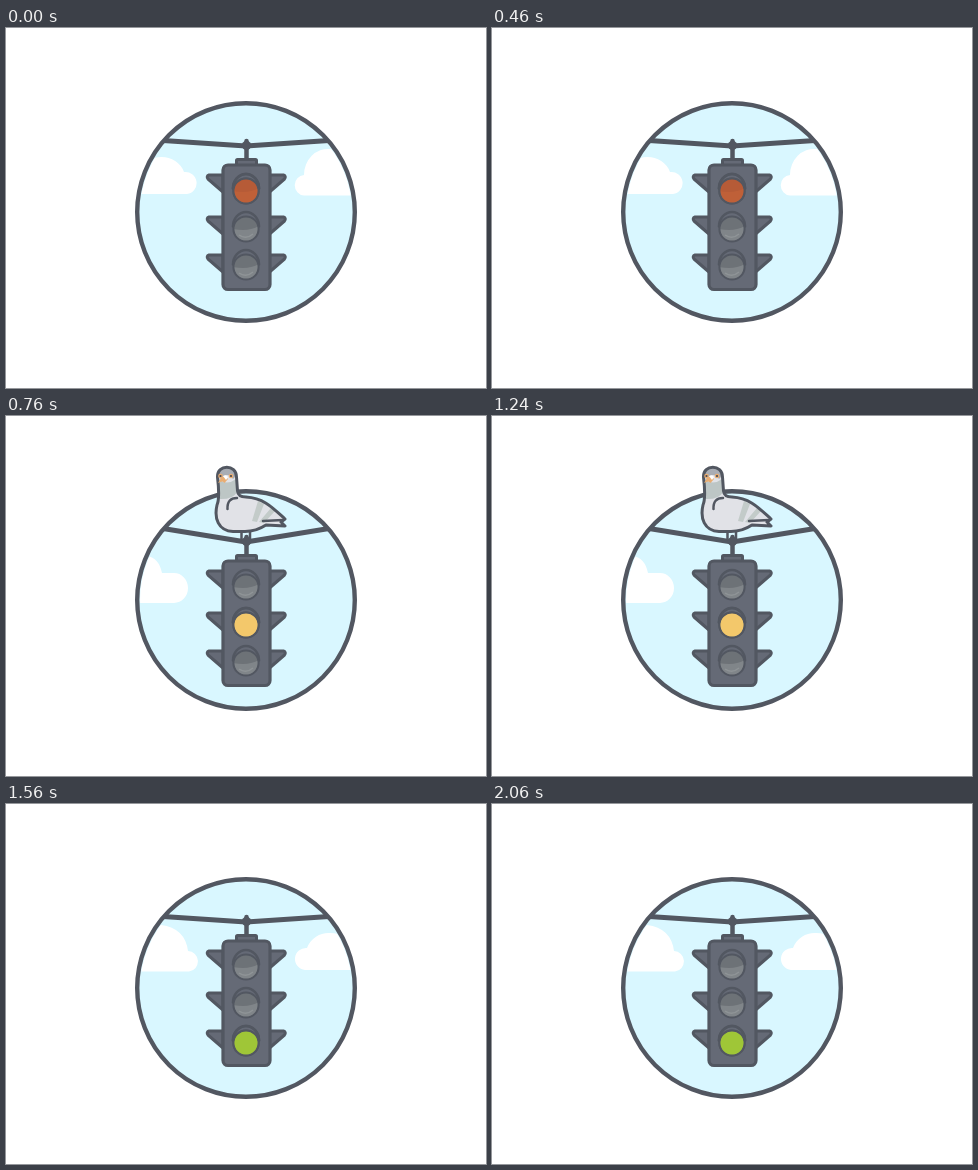
An HTML page that plays this animation: 480 by 360 pixels, repeating every 2400 ms.

```html
<!DOCTYPE html>
<html lang="en">
<head>
<meta charset="utf-8">
<title>Traffic light</title>
<style>
  html, body { margin: 0; width: 100%; height: 100%; overflow: hidden; background: #fff; }
  svg { display: block; width: 480px; height: 360px; }
  .stop, .wait, .go, .calm, .rig { animation: 2400ms step-end infinite; }
  .stop { animation-name: stop; }
  .wait { animation-name: wait; }
  .go { animation-name: go; }
  .calm { animation-name: calm; }
  .rig { animation-name: sag; }
  @keyframes stop { 0% { opacity: 1; } 31.6667%, 100% { opacity: 0; } }
  @keyframes wait { 0% { opacity: 0; } 31.6667% { opacity: 1; } 65%, 100% { opacity: 0; } }
  @keyframes go { 0% { opacity: 0; } 65%, 100% { opacity: 1; } }
  @keyframes calm { 0% { opacity: 1; } 31.6667% { opacity: 0; } 65%, 100% { opacity: 1; } }
  @keyframes sag { 0% { transform: none; } 31.6667% { transform: translateY(8px); } 65%, 100% { transform: none; } }
  .line { fill: none; stroke: #525761; stroke-linecap: round; stroke-linejoin: round; }
</style>
</head>
<body>
<svg viewBox="0 0 480 360">
  <defs>
    <clipPath id="disc"><circle cx="240" cy="184" r="109"/></clipPath>
    <clipPath id="inner"><circle cx="240" cy="184" r="106"/></clipPath>
    <clipPath id="glass"><circle r="12"/></clipPath>
    <path id="flap" d="M217 147H203Q200 148 202 151L217 164Z"/>
    <g id="flaps" fill="#656a76" stroke="#525761" stroke-width="3" stroke-linejoin="round">
      <use href="#flap"/>
      <use href="#flap" transform="matrix(-1 0 0 1 480.5 0)"/>
    </g>
    <g id="shade">
      <path d="M-13 0A13 14.5 0 0 1 13 0" class="line" stroke-width="2.6" transform="translate(0 -2.5)"/>
      <circle r="12.6" class="line" stroke-width="2"/>
    </g>
    <g id="lamp">
      <circle r="12" fill="#808589"/>
      <path clip-path="url(#glass)" d="M-13 -13H13V-3Q3 3 -13 0Z" fill="#6d7277"/>
      <path d="M-7 6Q0 11 7 5" fill="none" stroke="#8f9497" stroke-width="1.5"/>
      <use href="#shade"/>
    </g>
  </defs>

  <circle cx="240" cy="184" r="109" fill="#d9f7ff"/>
  <g clip-path="url(#inner)" fill="#fff">
    <g class="stop">
      <path d="M120 166V144H133A24 23 0 0 1 178 144A11 11 0 0 1 181 166Z"/>
      <path d="M360 167.500H298A10.300 10.300 0 0 1 298 147A24 26 0 0 1 324 121Q338 121 360 140Z"/>
    </g>
    <g class="wait">
      <path d="M120 187V145Q129 140 141 140Q153 142 156 157H168A14 15 0 0 1 168 187Z"/>
    </g>
    <g class="go">
      <path d="M120 167.500V126Q139 121 155 121Q179 124 182 147A10.300 10.300 0 0 1 183 167.500Z"/>
      <path d="M360 166H299A11 11 0 0 1 301 144A23 23 0 0 1 324 129Q340 129 360 144Z"/>
    </g>
  </g>

  <g clip-path="url(#disc)">
    <path class="line calm" stroke-width="5" d="M157 112.500L240 118L323 112.500"/>
    <path class="line wait" stroke-width="5" d="M157 112.500L240 126L323 112.500"/>
  </g>
  <circle class="line" cx="240" cy="184" r="108.800" stroke-width="4.400"/>

  <g class="wait">
    <path class="line" stroke-width="2.500" d="M235.500 114V123M244 114V123"/>
    <path d="M211.500 61C211 48 230.500 48 230.500 61L231.500 75Q232 81 240 81C258 82 267 92 279 103L276 106L279 110L260 109Q250 115.500 239 115.500H227C212 115 208 102 211 89Q214 82 211.500 61Z" fill="#e1e2e7"/>
    <path d="M212 63Q221 70 230 63L231 76Q227 84 212 83Z" fill="#bdc6c5"/>
    <path d="M212 60C212 49 230 49 230 60L227 63Q221 55 215 63Z" fill="#a9adb4"/>
    <path d="M265 92L253 106L258 107L269 95ZM252 85L246 105L251 106L258 88Z" fill="#c3cbc9"/>
    <path class="line" stroke-width="3" d="M211.500 61C211 48 230.500 48 230.500 61L231.500 75Q232 81 240 81C258 82 267 92 279 103L275 106L279 110L260 109Q250 115.500 239 115.500H227C212 115 208 102 211 89Q214 82 211.500 61Z"/>
    <path class="line" stroke-width="2.500" d="M231 82Q221 82 221.500 93M277 104L257 105"/>
    <g fill="#e9ad72">
      <circle cx="214.500" cy="60" r="2.300"/>
      <circle cx="225" cy="60" r="2.300"/>
      <path d="M215 62Q219 59 222 63L218.500 67Q217 64 212 67Z"/>
    </g>
    <path d="M217 60Q220 58 222 61L220 64Z" fill="#fff"/>
    <g fill="#454a53"><circle cx="214.500" cy="60" r="1.100"/><circle cx="225" cy="60" r="1.100"/></g>
  </g>

  <g class="rig">
    <path class="line" stroke-width="4.500" d="M240.500 113V130"/>
    <circle cx="240.500" cy="117.500" r="4.700" fill="#525761"/>
    <rect x="230.500" y="131.500" width="20" height="7" rx="1" fill="#656a76" stroke="#525761" stroke-width="3"/>
    <use href="#flaps"/>
    <use href="#flaps" y="42"/>
    <use href="#flaps" y="80"/>
    <rect x="217" y="137" width="47" height="124.500" rx="5" fill="#656a76" stroke="#525761" stroke-width="3.200"/>
    <use href="#lamp" x="240" y="163"/>
    <use href="#lamp" x="240" y="201"/>
    <use href="#lamp" x="240" y="239"/>
    <g class="stop" transform="translate(240 163)">
      <circle r="12" fill="#bf6038"/>
      <path clip-path="url(#glass)" d="M-13 -13H13V-3Q3 3 -13 0Z" fill="#b65b37"/>
      <use href="#shade"/>
    </g>
    <g class="wait" transform="translate(240 201)">
      <circle r="12" fill="#f3c86b"/>
      <use href="#shade"/>
    </g>
    <g class="go" transform="translate(240 239)">
      <circle r="12" fill="#9fc637"/>
      <use href="#shade"/>
    </g>
  </g>
</svg>
</body>
</html>
```
